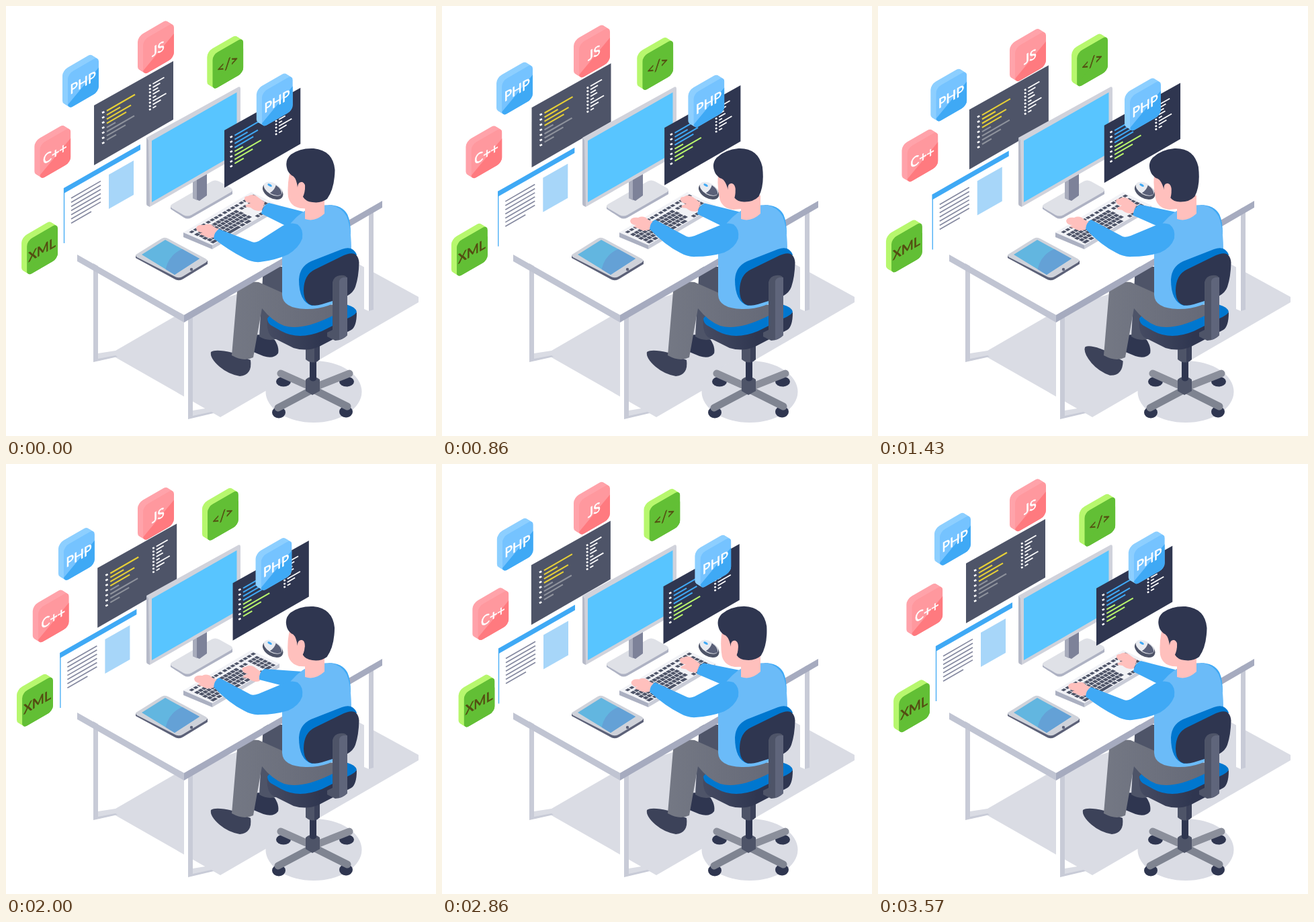
An HTML page for the animation above (3.64 s loop, 640 by 640 pixels).

```html
<!DOCTYPE html>
<html lang="en">
<head>
<meta charset="utf-8">
<title>Developer at a desk</title>
<style>
html, body { margin: 0; width: 100%; height: 100%; overflow: hidden; background: #fff; }
svg { display: block; width: 100%; height: 100%; }
text { font-family: Lato, "Open Sans", sans-serif; font-size: 19.5px; text-anchor: middle; stroke-width: .6; }
</style>
</head>
<body>
<svg viewBox="0 0 640 640">
  <defs>
    <clipPath id="face"><rect width="46" height="53" rx="8"/></clipPath>
    <clipPath id="glass"><path d="M202 370L237 348L288 376L251 400Z"/></clipPath>
    <linearGradient id="pants" x1="0" x2="1">
      <stop offset="0" stop-color="#747884"/><stop offset="1" stop-color="#656977"/>
    </linearGradient>
    <linearGradient id="seat" x1="0" x2="1">
      <stop offset="0" stop-color="#454b62"/><stop offset=".6" stop-color="#2f3650"/>
    </linearGradient>
  </defs>

  <!-- floor -->
  <path fill="#dadce4" d="M163 513L265 454L510 376L614 433V441L319 612L163 523Z"/>
  <ellipse cx="458" cy="574" rx="71.5" ry="46" fill="#dadce4"/>

  <!-- desk legs -->
  <g fill="#dadce4">
    <path d="M137 517L163 513V522L137 528Z"/>
    <path d="M278 602L303 598L309 605L278 612Z"/>
  </g>
  <g fill="#c8cbd7">
    <path d="M130 380H137V525L163 520L166 522L130 530Z"/>
    <path d="M271 455H278V610L306 604L309 606L271 615Z"/>
    <path d="M540 300H547V452L540 454Z"/>
  </g>
  <g fill="#fff">
    <path d="M265 460H271V613L265 610Z"/>
    <path d="M533 310H540V454L533 451Z"/>
  </g>

  <!-- chair base -->
  <g fill="#2f3650">
    <ellipse cx="413" cy="559" rx="11" ry="7.5"/><ellipse cx="507" cy="559" rx="11" ry="7.5"/>
  </g>
  <g stroke="#8b8f9b" stroke-width="11" stroke-linecap="round">
    <path d="M409 547L456 568M511 547L458 568"/>
  </g>
  <g fill="#2f3650">
    <ellipse cx="406" cy="605" rx="10" ry="8.5"/><ellipse cx="506" cy="604" rx="10" ry="8.5"/>
  </g>
  <g stroke="#7f8491" stroke-width="11" stroke-linecap="round">
    <path d="M405 598L456 571M508 596L458 571"/>
  </g>
  <path fill="#4e5468" d="M446 556Q456 547 467 556V573L456 579L446 573Z"/>
  <path fill="#2f3650" d="M452 525H462V556Q457 561 452 556Z"/>
  <path fill="#4e5468" d="M446 498H467V526Q457 535 446 526Z"/>
  <path fill="#3b4159" d="M459 498H467V526Q463 530 459 531Z"/>

  <!-- far leg -->
  <path fill="#2f3650" d="M371 490Q380 487 400 497Q407 508 405 517Q398 526 383 521L366 514Z"/>
  <path fill="#4e5468" d="M383 388H414V460L404 495Q390 500 377 492L380 440Z"/>

  <!-- seat -->
  <path fill="url(#seat)" d="M389 466Q387 486 396 493L428 509Q448 515 466 507L514 482Q522 477 522 456L470 470Z"/>
  <path fill="#0077cf" d="M389 465Q396 454 412 453L500 443Q520 446 522 455Q520 460 508 465L470 484Q436 498 410 484L394 475Q389 471 389 465Z"/>

  <!-- near leg -->
  <path id="shoe" fill="#3c4259" d="M305 515Q312 510 337 516L364 527Q367 549 348 551Q331 548 318 537Q303 524 305 515Z"/>
  <path fill="url(#pants)" d="M336 520L344 425Q350 408 376 411L414 428L490 446Q500 456 480 464Q440 483 414 476Q396 469 381 450L368 523Q354 530 336 520Z"/>

  <!-- desk top -->
  <path fill="#fff" d="M107 370L402 200L560 290L265 460Z"/>
  <path fill="#c0c4d2" d="M106 370L265 460V471L106 380Z"/>
  <path fill="#a6abbf" d="M265 460L560 290V300L265 471Z"/>

  <g id="codeA"></g>
  <g id="page">
    <path fill="#fff" d="M86 271L200 206V288L86 353Z"/>
    <path fill="#3fa9f5" d="M86 271L200 206V214L86 279Z"/>
    <path stroke="#3fa9f5" stroke-width="1.3" d="M86.5 271V353"/>
    <path fill="#a7d6f9" d="M153 251L190 230V281L153 302Z"/>
    <path id="lines" stroke="#8589a0" stroke-width="1.7"/>
  </g>

  <!-- monitor -->
  <path fill="#aeb2c3" d="M245 297V302L265 315Q270 318 276 315L337 280V274L270 300Z"/>
  <path fill="#dfe1e7" d="M247 295L306 261Q311 258 317 261L335 271Q339 274 335 277L276 311Q270 314 264 311L247 301Q243 298 247 295Z"/>
  <path fill="#7d8299" d="M278 258L299 246V282L288 290L278 286Z"/>
  <path fill="#a7abbb" d="M278 258L284 255V289L278 286Z"/>
  <path fill="#b6bac8" d="M209 196L214 198V299L210 297Q209 296 209 294Z"/>
  <path fill="#d0d2db" d="M209 196L346 120.500Q349 119.500 349 123V219Q349 222 346 223.500L214 299L212 200Z"/>
  <path fill="#58c5ff" d="M217 200.500L343.500 128.500V219L217 292Z"/>

  <g id="codeB"></g>
  <g id="icons"></g>

  <!-- tablet -->
  <path fill="#5c6178" d="M193 371V375L252 407Q258 410 264 406L300 384V379Z"/>
  <path fill="#cfd2da" d="M195 369L231 346.500Q236 343 242 346.500L297 376Q302 379 297 382L264 402Q258 406 252 403L195 374Q191 371 195 369Z"/>
  <path fill="#62b6e0" d="M202 370L237 348L288 376L251 400Z"/>
  <circle cx="277" cy="399" r="40" fill="#64a1d6" clip-path="url(#glass)"/>
  <circle cx="276" cy="392" r="2.200" fill="#5c6178"/>

  <!-- mouse -->
  <g transform="rotate(30 397 275)">
    <ellipse cx="397.500" cy="275.500" rx="16.500" ry="10.500" fill="#4e5468"/>
    <ellipse cx="396" cy="272.500" rx="15" ry="8.500" fill="#e9ebf0"/>
    <path fill="#5a6078" d="M397 265.500Q408 266 411 273Q407 280 395 280Q399 273 397 265.500Z"/>
    <ellipse cx="389" cy="270" rx="3.500" ry="1.600" fill="#3fa9f5"/>
  </g>

  <!-- keyboard -->
  <path fill="#abb0c1" d="M264 337L307 355V362L264 344Z"/>
  <path fill="#c9ccd7" d="M307 355L407 297V303L307 362Z"/>
  <path fill="#f1f2f6" d="M264 337L365 277L407 297L307 356Z"/>
  <path id="keys" fill="#4e5468" transform="matrix(.865 -.505 .9 .43 264 337)"/>

  <!-- far arm, body, near arm -->
  <path id="handR" fill="#ffc0bd" d="M355 288Q354 283 360 283Q366 279 373 283L385 292L381 304Q372 307 364 300L357 299Q355 296 360 295L364 293Q357 293 355 288Z"/>
  <path id="armR" fill="#3fa9f5"/>
  <path fill="#3fa9f5" d="M480 296Q500 296 508 310Q513 320 513 340H490Z"/>
  <path fill="#6bbbf8" d="M424 323Q440 304 461 297L483 296Q499 299 507 313Q514 330 514 365L508 430Q480 452 446 451Q412 450 411 430V360Z"/>
  <path fill="#ffc0bd" d="M445 282H474V309Q460 322 445 317Z"/>
  <path id="handL" fill="#ffc0bd" d="M280 320Q281 314 292 315Q300 311 307 318L315 322L309 333Q298 336 292 331L286 329Q285 327 290 326Q281 326 280 320Z"/>
  <path id="armL" fill="#3fa9f5"/>

  <!-- chair back -->
  <path fill="#0077cf" d="M436 407Q437 388 454 380L500 362Q516 356 522 370L480 440L455 446Q436 440 436 407Z"/>
  <path fill="#2f3650" d="M443 424Q443 400 460 392L503 371Q524 362 525.500 382Q525 403 520 418Q516 429 502 434L470 444Q444 452 443 424Z"/>
  <path fill="#4e5468" d="M478 486L486 482V411Q488 402 497 401Q507 400 508 406V490Q502 497 490 498L478 492Z"/>
  <path fill="#5f657b" d="M496 409Q498 403 508 404V490Q503 495 496 497Z"/>

  <g id="head">
    <path fill="#ffc0bd" d="M424 242Q418 262 420 284Q423 298 438 301L455 302V250Z"/>
    <path fill="#2f3650" d="M418 241Q415 229 424 221Q438 211 458 212Q487 215 489.500 244Q489 272 478 287Q469 294 456 292Q446 291 442 284L445 270L434 270Q432 254 425 252Q419 247 418 241Z"/>
    <path fill="#ffc0bd" d="M434 269Q435 261 441 262Q446 264 445 272Q444 283 440 285Q434 283 434 269Z"/>
  </g>
</svg>
<script>
const $ = id => document.getElementById(id);
const FRAME = 1000 / 14, LOOP = 3640, STEPS = 50;
const SLOPE = 0.577;

// row: a slanted stroke starting at x, y
const row = (x, y, len, s = SLOPE) => `M${x} ${y}l${len} ${-len * s}`;
const stroke = (d, color, w) => `<path d="${d}" stroke="${color}" stroke-width="${w}"/>`;

function codePanel(id, bg, colors, scale, inset) {
  const long = [42, 20, 36, 29, 13, 41, 28, 14];
  const short = [17, 11, 8, 10, 5, 20, 12, 5];
  const rows = (from, to) => long.slice(from, to)
    .map((n, i) => row(inset + 7, 8 + 6.2 * (from + i), n)).join('');
  let bullets = '', list = '';
  for (let i = 0; i < 7; i++) bullets += row(inset, 11 + 7.6 * i, 3.4, 0.5);
  short.forEach((n, i) => {
    bullets += row(inset + 70, -29 + 5.1 * i, 2.6, 0.5);
    list += row(inset + 75.5, -32 + 5.1 * i, n);
  });
  $(id).innerHTML = `<g transform="scale(${scale})">
    <path fill="${bg}" d="M0 0L118 -66V21L0 89Z"/>` +
    stroke(rows(0, 4), colors[0], 2.1) + stroke(rows(4, 8), colors[1], 2.1) +
    stroke(bullets, '#fff', 2.6) + stroke(list, '#fff', 1.8) + '</g>';
}
codePanel('codeA', '#4e5468', ['#e6cf36', '#8e929c'], 1, 12);
codePanel('codeB', '#2f3650', ['#3fa9f5', '#b9f56c'], 0.96, 9);

$('lines').setAttribute('d', [44, 44, 44, 44, 44, 44, 30]
  .map((n, i) => row(97, 286 + 6.2 * i, n)).join(''));

function keyboard() {
  let d = '';
  const key = (x, y, w, h) => d += `M${x} ${y}h${w}v${h}h${-w}z`;
  for (let c = 0; c < 16; c++) key(5 + c * 6.8 + Math.floor(c / 4) * 1.2, 4.5, 5, 4.5);
  for (let r = 0; r < 4; r++) {
    for (let c = 0; c < 12; c++) key(5 + c * 6.1 + (r % 2), 13 + r * 6.6, 5.1, 5.4);
    for (let c = 0; c < 3; c++) key(97 + c * 5.6, 13 + r * 6.6, 4.6, 5.4);
  }
  [[5, 8], [15, 6], [23, 30], [55, 6], [63, 8], [82, 4.5], [88, 4.5], [97, 9.5], [108, 4.5]]
    .forEach(([x, w]) => key(x, 39.5, w, 5));
  for (let c = 0; c < 2; c++) key(82 + c * 6, 13, 4.5, 5);
  $('keys').setAttribute('d', d);
}
keyboard();

const PINK = ['#ffa3aa', '#ff989e', '#ff7a7f', '#fff'];
const BLUE = ['#8dcfff', '#75c3ff', '#3fa9f5', '#fff'];
const GREEN = ['#b7f76e', '#62bf35', '#62bf35', '#544c12'];

const wave = k => Math.cos(2 * Math.PI * k / STEPS);
// orbit: centre, radius and the step at which each axis peaks
const orbit = (x, rx, px, y, ry, py) => k =>
  [x + rx * wave(k - px), y + ry * wave(k - py)];
// sway: there and back between two points
const sway = (x, y, dx, dy) => k => {
  const s = (1 - wave(k)) / 2;
  return [x + dx * s, y + dy * s];
};

// positions are the left and top limits of each tile
const tiles = [
  ['JS', PINK, sway(196, 22, 0, 13)],
  ['PHP', BLUE, sway(84, 72.5, -6.3, 23)],
  ['C++', PINK, orbit(40.1, 5.3, 41, 181.9, 5.6, 30.5)],
  ['XML', GREEN, orbit(18.5, 6.7, 43.5, 317.6, 6.6, 8.2)],
  ['&lt;/&gt;', GREEN, orbit(294.6, 6.6, 43.8, 40.8, 6.6, 8)],
  ['PHP', BLUE, orbit(371.2, 5.2, 40, 104.7, 5, 28.5)]
];

function tile([label, [side, light, dark, ink]]) {
  let edge = '';
  for (let i = 8; i > 0; i--)
    edge += `<rect x="${-i}" y="${-i * (0.62 + SLOPE)}" width="46" height="53" rx="8"/>`;
  return `<g><g transform="matrix(1 ${-SLOPE} 0 1 8 28.500)"><g fill="${side}">${edge}</g>
    <g clip-path="url(#face)"><path fill="${light}" d="M0 0H46V53H0Z"/>
    <path fill="${dark}" d="M0 46L46 17V53H0Z"/></g>
    <text x="22.500" y="33" fill="${ink}" stroke="${ink}">${label}</text></g></g>`;
}
$('icons').innerHTML = tiles.map(tile).join('');

const movers = [
  [$('codeA'), sway(131, 148, 5.4, 7)],
  [$('codeB'), sway(325, 185, 13, -8)],
  [$('page'), sway(0, 0, -5.8, 10.4)],
  ...tiles.map((t, i) => [$('icons').children[i], t[2]])
];

// eased value through [step, value] pairs
function track(k, keys) {
  const i = Math.max(1, keys.findIndex(p => p[0] >= k));
  const [a, u] = keys[i - 1], [b, v] = keys[i];
  const s = (k - a) / (b - a);
  return u + (v - u) * s * s * (3 - 2 * s);
}

const nod = [[0, 0], [8, 1], [20, 1], [29, 0], [36, 0], [44, 1], [50, 0]];
const left = [[0, 1], [9, 0], [36, 0], [44, 1], [50, 1]];
const right = [[0, 0], [12, 0.05], [20, 0.2], [28, 1], [35, 0.2], [45, 0.36], [50, 0]];
const tap = [[0, 0], [16, 0], [20, 1], [25, 0], [50, 0]];

const move = (el, x, y, more = '') => el.setAttribute('transform', `translate(${x} ${y}) ${more}`);

function draw(t) {
  const k = Math.min(STEPS, Math.floor((t % LOOP + 5) / FRAME));
  for (const [el, at] of movers) move(el, ...at(k));

  const n = track(k, nod), p = track(k, left), q = track(k, right);
  move($('head'), -4.5 * n, 0, `rotate(${-8 * n} 452 300)`);
  $('shoe').setAttribute('transform', `rotate(${9 * track(k, tap)} 355 532)`);
  move($('handL'), 3 * p, 11 * p);
  move($('handR'), -3.5 * q, 19 * q);

  const c = 14 * p, e = 8 * p;
  $('armL').setAttribute('d', `M317 ${318 + c}L${364 + 2 * p} ${343 + e}Q${368 + 2 * p} ${345 + e} 376 ${342 + e}
    L412 327Q424 321 434 325Q443 332 441 346Q436 360 420 ${367 + e / 3}Q400 ${373 + e * 0.7} 378 ${373 + e}
    Q366 ${374 + e} 354 ${367 + e}Q332 ${356 + e} 309 ${332 + c}Q310 ${322 + c} 317 ${318 + c}Z`);

  const x = -6 * q, y = 12 * q;
  $('armR').setAttribute('d', `M${391 + x} ${293 + y}L442 ${306 + y / 4}L440 335L416 ${327 + y / 3}
    L${380 + x / 2} ${309 + y}Q${382 + x} ${297 + y} ${391 + x} ${293 + y}Z`);
}

const start = performance.now();
function tick() {
  draw(performance.now() - start);
  requestAnimationFrame(tick);
}
tick();
</script>
</body>
</html>
```
